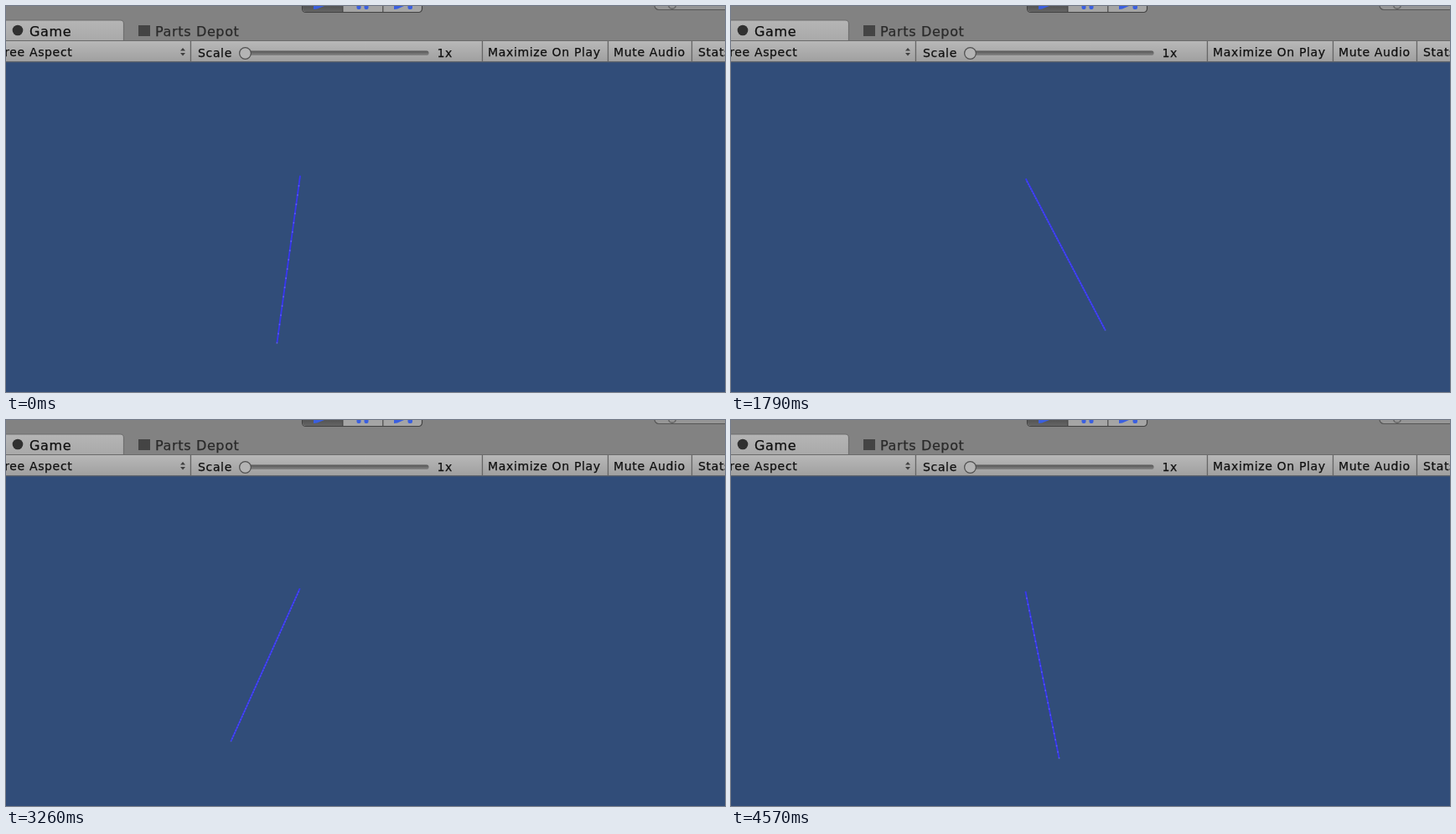
An HTML page with a canvas that plays this animation: 858 px wide and 461 px high, repeating every 4.8 s.

```html
<!DOCTYPE html>
<html lang="en">
<head>
<meta charset="utf-8">
<title>Pendulum</title>
<style>
html, body { margin: 0; width: 100%; height: 100%; overflow: hidden; background: #314d79; }
canvas { display: block; }
</style>
</head>
<body>
<canvas id="stage" width="858" height="461"></canvas>
<script>
const ctx = document.getElementById('stage').getContext('2d');
const LOOP = 4800, START = 1020, STEP = 77, LAST = 46;
const REST = -7.92, SWING = 28.4;

// Pendulum phase in radians at chosen steps
const PHASES = [[0, -0.2], [6, 0.691], [10, 1.365], [18, 2.504],
  [25, 3.578], [34, 4.917], [41, 5.904], [46, 6.698]];

function rect(x, y, w, h, fill) {
  ctx.fillStyle = fill;
  ctx.fillRect(x, y, w, h);
}

function box(x, y, w, h, r, fill, stroke) {
  ctx.beginPath();
  ctx.roundRect(x, y, w, h, r);
  ctx.fillStyle = fill;
  ctx.fill();
  if (stroke) {
    ctx.strokeStyle = stroke;
    ctx.lineWidth = 1.2;
    ctx.stroke();
  }
}

function disc(x, y, r, fill) {
  ctx.beginPath();
  ctx.arc(x, y, r, 0, Math.PI * 2);
  ctx.fillStyle = fill;
  ctx.fill();
}

function poly(points, fill) {
  ctx.beginPath();
  points.forEach(([x, y]) => ctx.lineTo(x, y));
  ctx.closePath();
  ctx.fillStyle = fill;
  ctx.fill();
}

function fade(y0, y1, top, bottom) {
  const g = ctx.createLinearGradient(0, y0, 0, y1);
  g.addColorStop(0, top);
  g.addColorStop(1, bottom);
  return g;
}

function label(text, x, y, size = 14, color = '#101010') {
  ctx.font = size + 'px "DejaVu Sans", sans-serif';
  ctx.letterSpacing = '0.65px';
  ctx.fillStyle = ctx.strokeStyle = color;
  ctx.lineWidth = 0.25;
  ctx.fillText(text, x, y);
  ctx.strokeText(text, x, y);
}

function drawPlayButtons() {
  const blue = '#3a5fe0';
  box(353.5, -12, 143, 19.5, 4, '#a5a5a5', '#424242');
  box(354, -12, 47.5, 19, [0, 0, 0, 4], fade(0, 7, '#555555', '#646464'));
  rect(401, 0, 1.5, 7, '#4c4c4c');
  rect(449, 0, 1.5, 7, '#5c5c5c');
  poly([[367, 0], [380, 0], [371, 3.5], [367, 4]], blue);
  box(418.5, -4, 5, 8, 2, blue);
  box(427.5, -4, 5, 8, 2, blue);
  poly([[463, 0], [475, 0], [467, 3.5], [463, 4]], blue);
  box(479.5, -4, 5.5, 8, 2, blue);
}

function drawTabs() {
  rect(0, 0, 858, 41, '#828282');
  drawPlayButtons();
  box(774, -12, 100, 16.5, 5, '#969696', '#555555');
  disc(795, -1, 5, '#646464');
  disc(795, -1, 3.5, '#969696');
  box(-8, 17, 148.5, 32, 4, fade(17, 41, '#b5b5b5', '#a9a9a9'), '#6e6e6e');
  disc(14, 29, 6.3, '#303030');
  label('Game', 28, 35.5, 16);
  rect(158, 23, 14, 13, '#444444');
  label('Parts Depot', 178, 35.5, 16, '#2a2a2a');
}

function drawToolbar() {
  rect(0, 41, 858, 26, fade(41, 67, '#b9b9b9', '#9f9f9f'));
  rect(0, 41, 858, 1, '#6a6a6a');
  rect(0, 66, 858, 1.3, '#5f646c');
  for (const x of [220, 568, 718, 818]) rect(x - 0.2, 42, 1.3, 24, '#666666');

  label('Free Aspect', -9.5, 60);
  poly([[208, 53.6], [211, 50], [214, 53.6]], '#404040');
  poly([[208, 56], [211, 59.6], [214, 56]], '#404040');

  label('Scale', 229, 61);
  box(280, 53.5, 224.5, 5.5, 2.5, fade(53, 59, '#505050', '#858585'));
  disc(285.5, 56.5, 7.5, '#505050');
  disc(285.5, 56.5, 6.2, '#b4b4b4');
  label('1x', 514.5, 61);

  label('Maximize On Play', 575, 60);
  label('Mute Audio', 725, 60);
  label('Stats', 826, 60);
}

function phaseAt(step) {
  const i = Math.max(1, PHASES.findIndex(([k]) => k >= step));
  const [k0, p0] = PHASES[i - 1], [k1, p1] = PHASES[i];
  return p0 + (p1 - p0) * (step - k0) / (k1 - k0);
}

function drawRod(angle) {
  const x = 351.2 + 0.02 * angle, y = 204.5 + 0.1 * angle;
  const length = 201.3 + 0.08 * angle, a = angle * Math.PI / 180;
  const dx = length * Math.sin(a), dy = length * Math.cos(a);
  ctx.beginPath();
  ctx.moveTo(x, y - 1);
  ctx.lineTo(x + dx, y + dy);
  ctx.strokeStyle = '#3737ee';
  ctx.lineWidth = 1.9;
  ctx.stroke();

  // A pale dot wherever the line shifts one column, softer as it tilts
  const count = Math.floor(Math.abs(dx) / 1.467);
  const dot = `rgba(125,125,250,${0.75 * (1 - Math.abs(angle) / 45)})`;
  for (let i = 0; i < count; i++) {
    const s = 1 - i / count;
    rect(x + dx * s - 0.8, y + dy * s - 0.8, 1.6, 1.6, dot);
  }
}

function drawCursor(x, y) {
  const shape = [[0, 0], [0, 16], [3.7, 12.6], [6.3, 18.5], [8.8, 17.4],
    [6.3, 11.6], [11.3, 11.6]].map(([u, v]) => [x + u, y + v]);
  poly(shape, '#ffffff');
  ctx.strokeStyle = '#151515';
  ctx.lineWidth = 1;
  ctx.stroke();
}

function draw(now) {
  const t = now % LOOP;
  const step = Math.min(LAST, Math.floor((t - START) / STEP));
  rect(0, 0, 858, 461, '#314d79');
  drawTabs();
  drawToolbar();
  drawRod(step < 0 ? REST : SWING * Math.sin(phaseAt(step)));
  if (step >= 18 && step <= 20) drawCursor(763 + 10.5 * (step - 18), 448 + 2 * (step - 18));
}

const origin = performance.now();
function tick() {
  draw(performance.now() - origin);
  requestAnimationFrame(tick);
}
tick();
</script>
</body>
</html>
```
